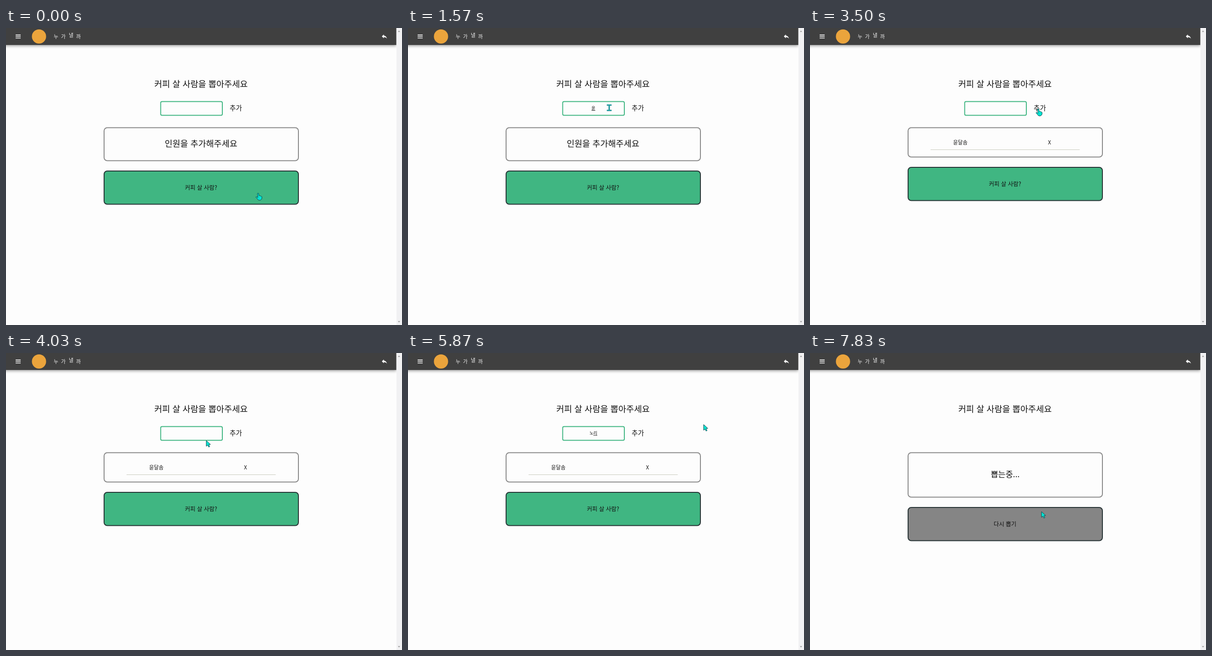
An HTML page that plays this animation: 864 px wide and 648 px high, repeating every 8 s.

```html
<!DOCTYPE html>
<html lang="ko">
<head>
<meta charset="utf-8">
<style>
html, body { margin: 0; width: 100%; height: 100%; overflow: hidden; background: #fdfdfd; }
svg { display: block; width: 100vw; height: 100vh; }
text { font-family: "Noto Sans CJK KR", "Noto Sans CJK", sans-serif; text-anchor: middle; fill: #111; }
.bar { fill: #404040; filter: drop-shadow(0 2px 3px rgba(0,0,0,.4)); }
.brand text { font-size: 11px; font-weight: 300; fill: #eee; }
.box { fill: none; stroke: #888; stroke-width: 2; }
.rule { stroke: #c8cabd; }
.cursor path { fill: #00e5d2; stroke: #14444c; stroke-linejoin: round; }
</style>
</head>
<body>
<svg viewBox="0 0 864 648">
  <rect width="864" height="648" fill="#fdfdfd"/>
  <rect class="bar" x="-10" y="-10" width="861.5" height="47"/>
  <path d="M21 14.9h11M21 18.3h11M21 21.7h11" stroke="#fff" stroke-width="1.5"/>
  <circle cx="72" cy="18.5" r="15.5" fill="#eba43c"/>
  <g class="brand">
    <text x="109" y="22.5">누</text><text x="125" y="22.5">가</text>
    <text x="142" y="20">낼</text><text x="158" y="22.5">까</text>
  </g>
  <path transform="translate(818.2 10.8) scale(.62)" fill="#fff" d="M10 9V5l-7 7 7 7v-4.1c5 0 8.5 1.6 11 5.1-1-5-4-10-11-11z"/>
  <rect x="852" width="12" height="648" fill="#f1f1f3"/>
  <path d="M855 8.500h5l-2.500-3zM855 639.500h5l-2.500 3z" fill="#999"/>
  <g id="page"></g>
  <g id="cursor" class="cursor"></g>
</svg>
<script>
const LOOP = 8000, FIRST_ADDED = 3300, SECOND_ADDED = 6000, PICKING = 7300;
const GREEN = '#40b682';
const names = ['윤달솜', '노리'];

const typing = [
  [1330, 'ㅇ'], [1400, '유'], [1570, '윤'], [1670, '윤ㄷ'], [1730, '윤다'],
  [1900, '윤달'], [2000, '윤달ㅅ'], [2100, '윤달소'], [2500, names[0]], [FIRST_ADDED, ''],
  [5070, 'ㄴ'], [5130, '노'], [5300, '놀'], [5870, names[1]], [SECOND_ADDED, '']
];

// Pointer hot spot: time, x, y
const route = [
  [0, 550, 361], [30, 550, 361], [300, 441, 174], [400, 439, 174],
  [2600, 439, 174], [2970, 494, 179], [3100, 498, 177], [3500, 498, 177],
  [4030, 437, 191], [4170, 432, 178], [4270, 432, 178], [4600, 645, 156],
  [6470, 645, 156], [6830, 523, 290], [7130, 508, 349], [7800, 508, 349],
  [7830, 505, 346], [LOOP, 505, 346]
];

const shapes = {
  arrow: '<path d="M0 0V12.500L3 10 5.300 14.300 7.500 13.200 5.300 9 9.200 8.600Z"/>',
  hand: '<path d="M-1.500 0Q0-1.500 1.300 0L2 5Q4 4 4.700 5.500 6.500 5 7 6.500 8.500 6.500 8.500 8L8 12Q6.500 15 3 15 0 15-1.500 12L-5 8Q-4.500 6.500-2.500 7.500L-.5 9Z"/>',
  beam: '<path d="M-5-7H5V-4.800H1.200V4.800H5V7H-5V4.800H-1.200V-4.800H-5Z" style="fill:#16a3a8;stroke:#20757c;stroke-width:.5"/>'
};

const page = document.getElementById('page');
const cursor = document.getElementById('cursor');

const label = (x, y, size, content) =>
  `<text x="${x}" y="${y + size * .37}" font-size="${size}">${content}</text>`;
const box = (y, height, attrs = '') =>
  `<rect class="box" x="214" y="${y}" width="424" height="${height}" rx="7" ${attrs}/>`;
const inside = ([x, y], left, top, right, bottom) =>
  x >= left && x <= right && y >= top && y <= bottom;

function stateAt(t) {
  const rows = (t >= FIRST_ADDED) + (t >= SECOND_ADDED);
  const listHeight = rows ? 31 + 33 * rows : 72;
  const typed = typing.filter(([start]) => start <= t).pop();
  return { rows, listHeight, buttonTop: 242 + listHeight, picking: t >= PICKING, draft: typed ? typed[1] : '' };
}

function pageMarkup({ rows, listHeight, buttonTop, picking, draft }) {
  let out = label(425.5, 122, 18.6, '커피 살 사람을 뽑아주세요');
  if (!picking) {
    const composing = `${draft.slice(0, -1)}<tspan text-decoration="underline">${draft.slice(-1)}</tspan>`;
    out += `<rect x="337.500" y="160.500" width="134.500" height="30" rx="3" fill="none" stroke="${GREEN}" stroke-width="2"/>`
      + label(404.5, 175, 9.1, composing) + label(501.5, 175, 14.6, '추가');
  }
  out += box(217.5, listHeight);
  if (picking) out += label(426, 265, 17.5, '뽑는중...');
  else if (!rows) out += label(425.5, 252.5, 18.5, '인원을 추가해주세요');
  else names.slice(0, rows).forEach((name, i) => {
    const y = 249.5 + 33 * i;
    out += label(328, y, 11.4, name) + label(522.5, y, 11.4, 'X')
      + `<path class="rule" d="M263 ${y + 16}H588.500"/>`;
  });
  return out + box(buttonTop - 2, 72.5, `style="fill:${picking ? '#858585' : GREEN};stroke:#263234"`)
    + label(425.5, buttonTop + 34.5, 12.5, picking ? '다시 뽑기' : '커피 살 사람?');
}

function pointAt(t) {
  const next = route.findIndex(([time]) => time > t);
  const [t0, x0, y0] = route[next - 1], [t1, x1, y1] = route[next];
  const p = (t - t0) / (t1 - t0), ease = p * p * (3 - 2 * p);
  return [x0 + (x1 - x0) * ease, y0 + (y1 - y0) * ease];
}

function cursorShape(point, { picking, buttonTop }) {
  if (picking) return 'arrow';
  if (inside(point, 337, 160, 473, 190)) return 'beam';
  const clickable = inside(point, 486, 165, 517, 187) || inside(point, 213, buttonTop - 3, 639, buttonTop + 71);
  return clickable ? 'hand' : 'arrow';
}

let shownPage;
function render(now) {
  const t = now % LOOP, state = stateAt(t), point = pointAt(t);
  const markup = pageMarkup(state);
  if (markup !== shownPage) page.innerHTML = shownPage = markup;
  cursor.innerHTML = shapes[cursorShape(point, state)];
  cursor.setAttribute('transform', `translate(${point})`);
}

const start = performance.now();
function tick() {
  render(performance.now() - start);
  requestAnimationFrame(tick);
}
tick();
</script>
</body>
</html>
```
